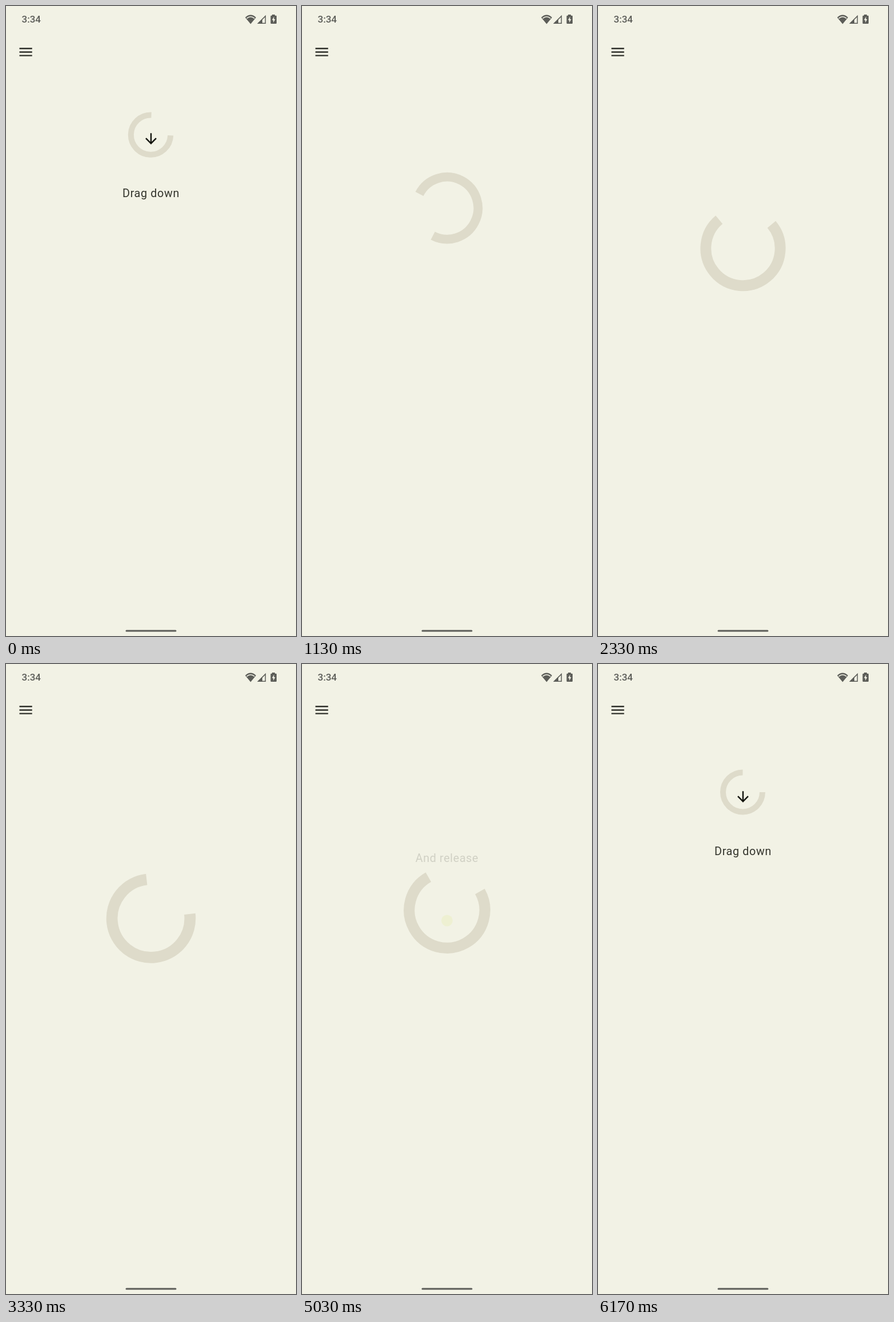
Recreate the animation shown at these times as an HTML page. Size 508 px wide and 1101 px high, loop 6410 ms.

```html
<!DOCTYPE html>
<html lang="en">
<head>
<meta charset="utf-8">
<title>Drag and release</title>
<style>
  html, body { margin: 0; width: 100%; height: 100%; overflow: hidden; background: #f2f2e5; }
  svg { display: block; width: 508px; height: 1101px; }
  text { font-family: Roboto, sans-serif; }
  .label { font-size: 19.8px; letter-spacing: .62px; text-anchor: middle; fill: #34352d; }
  .status { fill: #5c5d58; }
  .clock { font-size: 17px; font-weight: 500; }
</style>
</head>
<body>
<svg viewBox="0 0 508 1101">
  <rect width="508" height="1101" fill="#f2f2e5"/>

  <g class="status">
    <text class="clock" x="27.5" y="29">3:34</text>
    <path d="M419 20Q428.5 11.2 438 20L428.5 31.5Z"/>
    <path d="M421.6 21.6Q428.5 16 435.4 21.6" fill="none" stroke="#f2f2e5" stroke-width="1.5"/>
    <path d="M441.8 30.2H454.4V17.6Z" fill="none" stroke="#5c5d58" stroke-width="1.5"/>
    <path d="M440.5 31L449 22.5V31Z"/>
    <path d="M466 15h5v1.8h1.8q1.2 0 1.2 1.2v11.8q0 1.2-1.2 1.2h-8.1q-1.2 0-1.2-1.2V18q0-1.2 1.2-1.2H466z"/>
    <path d="M469.4 18.6l-3.4 6.2h2.2v4.4l3.4-6.2h-2.2z" fill="#f2f2e5"/>
    <rect x="209.5" y="1090.6" width="89" height="3" rx="1.5"/>
  </g>

  <path transform="translate(19.8 65.6) scale(1.236)" fill="#2f302a"
        d="M3 6h18v2H3zM3 11h18v2H3zM3 16h18v2H3z"/>

  <!-- three quarters of a circle, open at the top right -->
  <path id="ring" d="M34.5 0A34.5 34.5 0 1 1 0 -34.5" fill="none" stroke="#dedbca" stroke-width="10"/>

  <g id="start">
    <path transform="translate(239.17 217.2) scale(1.236)" fill="#14150f"
          d="M20 12l-1.41-1.41L13 16.17V4h-2v12.17l-5.58-5.59L4 12l8 8z"/>
    <text class="label" x="254" y="334">Drag down</text>
  </g>
  <g id="end">
    <text class="label" x="254" y="346.3">And release</text>
    <circle cx="254" cy="448.4" r="10" fill="#dceb7a"/>
  </g>
</svg>
<script>
const LOOP = 6410, RELEASE = 4867, RETURN = 1000, FADE = 300, ARRIVE = 4035;

// finger drag: [ms, progress]
const drag = [[0, .0045], [670, .366], [1130, .575], [1330, .645], [2000, .835],
              [2330, .889], [2670, .926], [3330, .982], [4070, 1]];

const [ring, start, end] = ['ring', 'start', 'end'].map(id => document.getElementById(id));
const clamp = v => Math.min(1, Math.max(0, v));

// cubic-bezier(.4, 0, .2, 1)
function ease(x) {
  x = clamp(x);
  let lo = 0, hi = 1;
  for (let i = 0; i < 24; i++) {
    const s = (lo + hi) / 2, r = 1 - s;
    if (1.2 * s * r * r + .6 * s * s * r + s ** 3 < x) lo = s; else hi = s;
  }
  return lo * lo * (3 - 2 * lo);
}

const secant = i => (drag[i + 1][1] - drag[i][1]) / (drag[i + 1][0] - drag[i][0]);

function slope(i) {
  if (i === 0) return secant(0);
  if (i === drag.length - 1) return 0;
  return (secant(i - 1) + secant(i)) / 2;
}

// smooth curve through the drag points
function dragged(t) {
  const i = drag.findIndex(k => k[0] > t) - 1;
  if (i < 0) return 1;
  const [t0, a] = drag[i], [t1, b] = drag[i + 1];
  const d = t1 - t0, u = (t - t0) / d, v = 1 - u;
  return a * (1 + 2 * u) * v * v + b * u * u * (3 - 2 * u)
       + d * u * v * (slope(i) * v - slope(i + 1) * u);
}

const fadeFrom = (t, t0) => ease((t - t0) / FADE);

function draw(now) {
  const t = now % LOOP;
  const p = t < RELEASE ? dragged(t) : 1 - ease((t - RELEASE) / RETURN);
  const x = 253.5 + .5 * clamp(4 * p), y = 224 + 224.5 * p;
  ring.setAttribute('transform', `translate(${x} ${y}) rotate(${360 * p}) scale(${1 + p})`);
  start.setAttribute('opacity', t < RELEASE ? 1 - fadeFrom(t, 0) : fadeFrom(t, RELEASE + RETURN));
  end.setAttribute('opacity', t < RELEASE ? fadeFrom(t, ARRIVE) : 1 - fadeFrom(t, RELEASE));
}

function tick() {
  draw(performance.now());
  requestAnimationFrame(tick);
}
tick();
</script>
</body>
</html>
```
